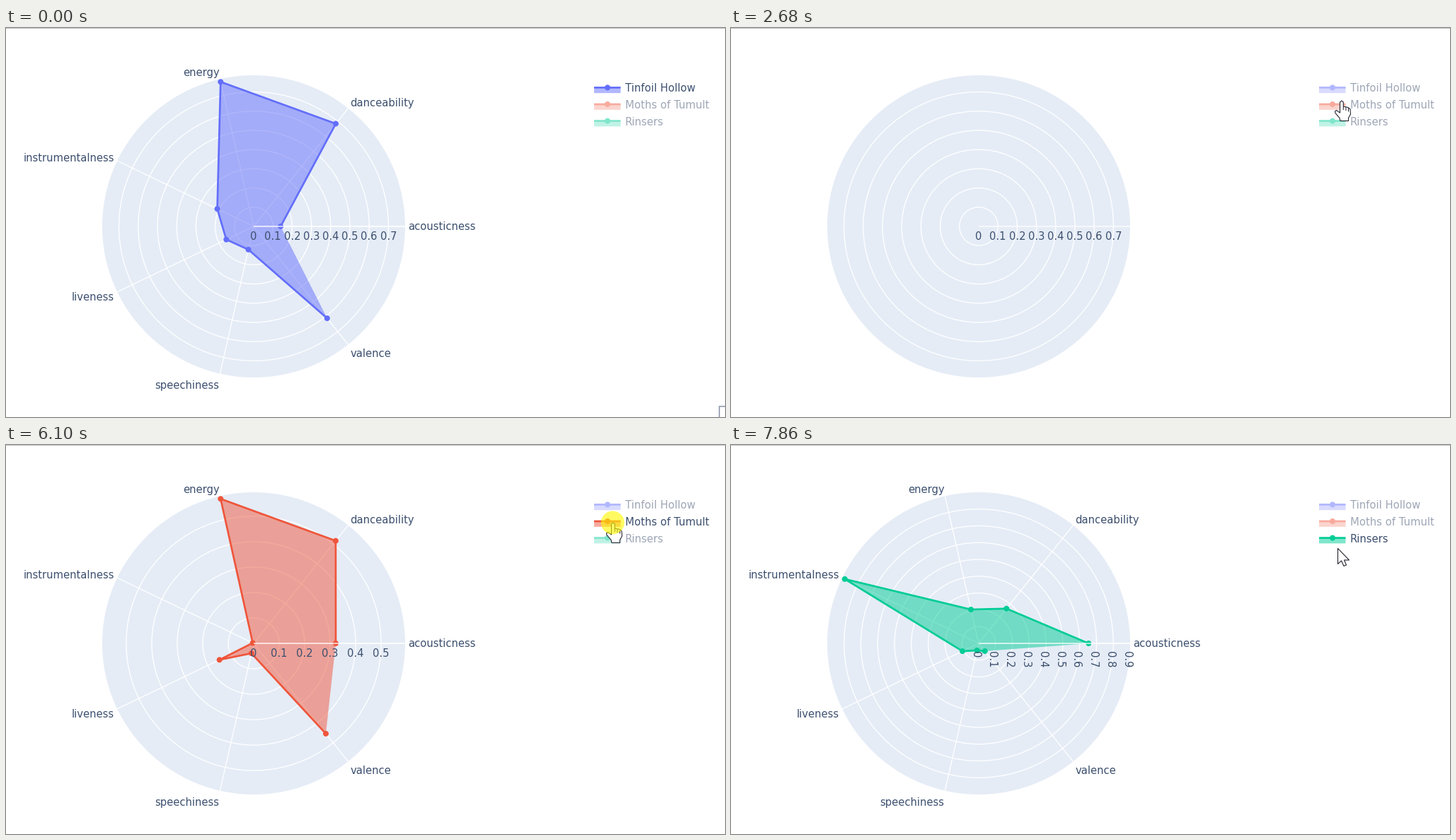
Recreate the animation shown at these times as a matplotlib script. Size 1016x551 px, loop 8 s.

```python
import numpy as np
import matplotlib.pyplot as plt
from matplotlib.animation import FuncAnimation
from matplotlib.colors import to_rgb
from matplotlib.patches import Circle, Polygon, Rectangle

W, H, DPI = 1016, 551, 128
PX = 72 / DPI                     # points per pixel
LOOP, INTERVAL, TICK = 8000, 25, 67.1
CX, CY, RADIUS, REACH = 350, 281, 214, 210
INK, OUTLINE = "#3c4f6e", "#22222e"

CATEGORIES = ("acousticness danceability energy instrumentalness "
              "liveness speechiness valence").split()
ANGLES = np.linspace(0, 2 * np.pi, len(CATEGORIES), endpoint=False)
SERIES = [
    ("Tinfoil Hollow", "#636efa", [.14, .684, .772, .21, .158, .124, .612]),
    ("Moths of Tumult", "#ef553b", [.322, .516, .583, .004, .149, .04, .454]),
    ("Rinsers", "#00cc96", [.653, .265, .207, .883, .107, .043, .059]),
]

# Pointer stops: start ms, end ms, x, y
MOVES = [(0, 390, 759, 397), (600, 790, 772, 189), (1070, 1940, 863, 85),
         (2340, 2890, 863, 106), (4870, 5080, 859, 124),
         (5360, 5710, 858, 110), (6160, 6780, 858, 132),
         (7580, 7850, 857, 146)]
CLICKS = [2280, 3350, 6100, 7170]
REDRAW_DELAY, HALO_TIME = 400, 60

plt.rcParams["font.family"] = "DejaVu Sans"
fig = plt.figure(figsize=(W / DPI, H / DPI), dpi=DPI, facecolor="white")
ax = fig.add_axes([0, 0, 1, 1])
ax.set(xlim=(0, W), ylim=(H, 0))
ax.axis("off")


def label(x, y, text, ha="left", **kw):
    kw = {"va": "baseline", "color": INK, "zorder": 8, **kw}
    return ax.text(x, y, text, ha=ha, fontsize=14.7 * PX, **kw)


def line(xs, ys, color, width, zorder):
    return ax.plot(xs, ys, color=color, lw=width * PX, zorder=zorder,
                   snap=False, solid_joinstyle="round",
                   solid_capstyle="butt")[0]


def patch(shape):
    shape.set_snap(False)
    return ax.add_patch(shape)


def dot(x, y, color):
    return patch(Circle((x, y), 4, fc=color, lw=0, zorder=5))


def polar(radius, angle):
    return CX + radius * np.cos(angle), CY - radius * np.sin(angle)


def tint(color, strength):
    """Blend a color with white."""
    return tuple(1 - strength * (1 - c) for c in to_rgb(color))


def show(artists, visible):
    for artist in artists:
        artist.set_visible(visible)


def make_spoke(name, angle):
    """A grid line with its name just outside the disc."""
    cos, sin = np.cos(angle), np.sin(angle)
    x, y = polar(RADIUS, angle)
    lift = (10 if sin > 0 else 16) * sin
    return [line([CX, x], [CY, y], "white", 1.33, 2),
            label(x + 4.5 * cos, y - lift + 5.3, name,
                  "left" if cos > 0 else "right")]


def make_scale(values):
    """Rings and numbers per 0.1; the numbers turn when they are crowded."""
    step = 0.1 * REACH / max(values)
    artists = []
    for k in range(int(RADIUS / step + 0.01) + 1):
        x, text = CX + k * step, f"{k / 10:.1f}" if k else "0"
        if step > 25:
            artists.append(label(x, 300.3, text, "center"))
        else:
            artists.append(label(x - 4.8, 292.5, text, "center", va="top",
                                 rotation=270))
        if 0 < k * step < RADIUS - 1:
            artists.append(patch(Circle((CX, CY), k * step, fill=False,
                                        ec="white", lw=1.33 * PX, zorder=2)))
    return artists


def make_trace(color, values):
    xs, ys = polar(REACH * np.array(values) / max(values), ANGLES)
    fill = patch(Polygon(np.column_stack([xs, ys]), fc=color, alpha=0.5,
                         lw=0, zorder=3))
    dots = [dot(x, y, color) for x, y in zip(xs, ys)]
    return [fill, line(xs, ys, color, 2.67, 4), *dots]


def make_legend_row(index, name):
    y = 84.4 + 23.6 * index
    return (patch(Rectangle((831, y), 37.5, 7.8, lw=0, zorder=3)),
            line([831, 868.5], [y, y], INK, 2.67, 4),
            dot(850, y, INK),
            label(875, y + 5.9, name))


patch(Rectangle((0, 0), W, 1, fc="#c0c0c0", lw=0))
patch(Circle((CX, CY), RADIUS, fc="#e5ecf6", lw=0, zorder=1))
line([CX, CX + RADIUS], [CY, CY], "white", 1.33, 6)
corner = line([W + 1, 1008, 1008], [536, 536, H + 1], "#a3abba", 2, 1)

spokes = sum(map(make_spoke, CATEGORIES, ANGLES), [])
scales = [make_scale(values) for _, _, values in SERIES]
traces = [make_trace(color, values) for _, color, values in SERIES]
legend = [make_legend_row(i, name) for i, (name, _, _) in enumerate(SERIES)]

# Pointer shapes relative to the hot spot
ARROW = np.array([(0, 0), (0, 22), (5, 17.5), (8.5, 25), (12, 23.5),
                  (9, 16.5), (16, 16.5)]) + 0.5
HAND = np.array([(-2.5, 2), (0, 0), (2.3, 2), (2.3, 8), (9, 9.5), (12, 12),
                 (12.5, 19), (9.5, 24.5), (9.5, 28.5), (-2, 28.5), (-3, 24.5),
                 (-9, 17.5), (-9.5, 15), (-7.5, 13.5), (-2.5, 17)])
pointer = patch(Polygon(ARROW, fc="white", ec=OUTLINE, lw=1.1 * PX,
                        joinstyle="round", zorder=20))
creases = [line([0, 0], [0, 0], OUTLINE, 1, 21) for _ in range(3)]
halo = patch(Circle((0, 0), 16.5, fc="#fff800", alpha=0.62, lw=0, zorder=22))


def pointer_position(t):
    x, y = W - 16, H - 11
    for start, end, to_x, to_y in MOVES:
        p = np.clip((t - start) / (end - start), 0, 1)
        ease = 1 - (1 - p) ** 2
        x, y = x + (to_x - x) * ease, y + (to_y - y) * ease
    return x, y


def draw_pointer(t):
    x, y = pointer_position(t)
    over_legend = 826 < x < 1000 and 73 < y < 144
    pointer.set_visible(t > 0)
    pointer.set_xy((HAND if over_legend else ARROW) + (x, y))
    show(creases, over_legend)
    for k, crease in enumerate(creases):
        top = y + 8 + 1.2 * k
        crease.set_data([x + 2.3 + 3.6 * k] * 2, [top, top + 5])
    halo.set_visible(any(c <= t < c + HALO_TIME for c in CLICKS))
    halo.center = x - 0.7, y


def update(frame):
    # The screen refreshes in coarse ticks
    t = TICK * int((frame * INTERVAL + 20) / TICK)
    # Clicks alternately hide the current trace and show the next one
    done = sum(t >= c + REDRAW_DELAY for c in CLICKS)
    current, hidden = divmod(done, 2)
    for i, (_, color, _) in enumerate(SERIES):
        on = i == current and not hidden
        show(scales[i], i == current)
        show(traces[i], on)
        box, key, marker, text = legend[i]
        strength = 1 if on else 0.5
        box.set_facecolor(tint(color, strength / 2))
        key.set_color(tint(color, strength))
        marker.set_facecolor(tint(color, strength))
        text.set_alpha(strength)
    show(spokes, not hidden)
    corner.set_visible(t == 0)
    draw_pointer(t)
    return []


anim = FuncAnimation(fig, update, frames=LOOP // INTERVAL, interval=INTERVAL,
                     init_func=lambda: update(0), repeat=True, repeat_delay=0,
                     blit=False)
plt.show()
```
